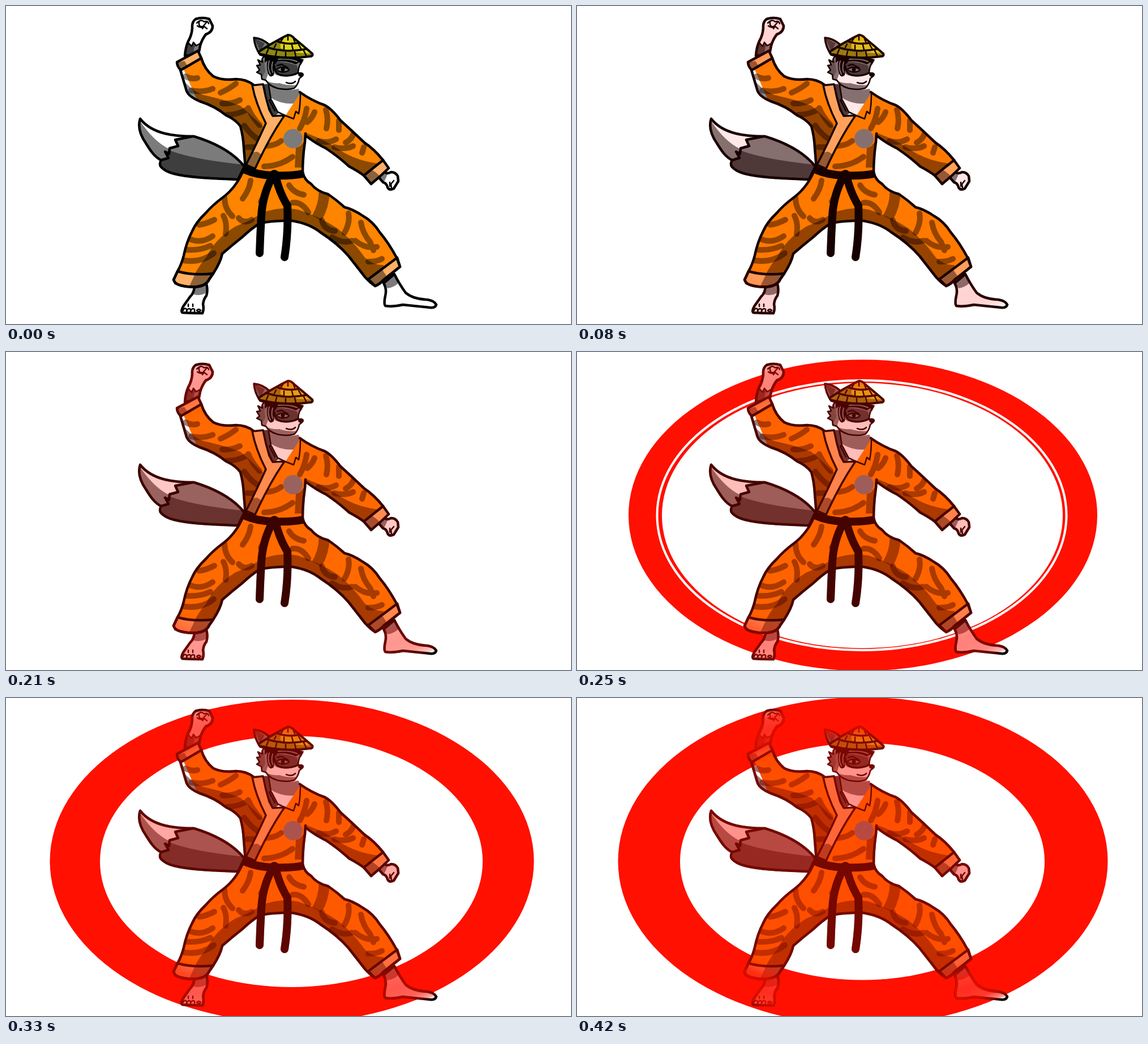
Write an HTML page that moves like this. It is 998 px wide and 561 px high and loops after 500 ms.

```html
<!DOCTYPE html>
<html lang="en">
<head>
<meta charset="utf-8">
<title>Karate fox</title>
<style>
  html, body { margin: 0; width: 100%; height: 100%; overflow: hidden; background: #fff; }
  svg { display: block; width: 998px; height: 561px; }
  .ink { fill: none; stroke: #000; stroke-width: 4.5; stroke-linejoin: round; stroke-linecap: round; }
  .thin { stroke-width: 2.5; }
  .stripe { fill: none; stroke: #000; stroke-opacity: .45; stroke-width: 10; stroke-linecap: round; stroke-linejoin: round; }
  .shade { fill: #000; fill-opacity: .45; }
  .cloth { fill: #ff8400; }
  .trim { fill: #ffb066; }
  .grey { fill: #7b7b7b; }
  .dark { fill: #3e3e3e; }
  .white { fill: #fff; }
</style>
</head>
<body>
<svg viewBox="0 0 998 561">
  <defs>
    <path id="tail" d="M237 199C232 214 238 229 247 242C255 255 262 266 274 272Q270 280 274 284Q281 292 297 296C325 303 365 304 410 306L421 283C400 257 365 240 332 230C300 230 259 227 237 199Z"/>
    <path id="pants" d="M420 288C412 308 401 324 384 337Q365 351 353 365Q336 381 329 397Q319 416 314 440Q310 456 303 468L296 483Q298 490 309 493Q328 498 345 494Q356 490 359 482L366 472Q379 452 382 437Q398 423 417 408Q434 392 449 383Q474 378 506 379Q536 384 555 399Q586 419 605 441Q620 460 634 478Q643 488 652 494Q661 490 667 483L696 460L690 444Q676 418 660 399Q648 380 630 370Q612 358 598 355Q585 343 569 332Q549 327 539 314Q527 307 524 293Q470 305 420 288Z"/>
    <path id="jacket" d="M308 113Q313 130 319 150Q323 160 342 168Q370 177 389 193Q405 200 414 212Q419 230 420 250L423 287Q470 304 524 294Q524 265 529 238L531 230Q548 243 565 251Q590 268 606 283Q623 292 632 299L666 272Q650 252 633 241Q611 220 591 202Q575 181 563 175Q540 167 519 152L492 194L437 139Q424 129 406 129Q382 132 366 124Q351 112 345 92Z"/>
    <path id="lapel" d="M435 140L454 138Q458 160 465 183L471 194L492 193Q466 230 440 287L424 280Q440 249 459 207Q441 172 435 140Z"/>
    <path id="cuffA" d="M302 99L339 79L345 92L309 113Q302 107 302 99Z"/>
    <path id="cuffB" d="M666 272L676 286Q662 300 645 314L632 299Z"/>
    <path id="cuffC" d="M303 468Q330 476 366 472L359 482Q354 493 338 495Q313 497 299 489L296 483Z"/>
    <path id="cuffD" d="M691 444L696 460L667 483Q661 491 652 494L640 482Z"/>
    <path id="fist" d="M316 88Q317 73 322 62Q328 52 329 39Q328 28 335 23Q347 19 359 23L365 35Q365 46 353 50Q346 59 343 70L340 85Z"/>
    <path id="hand" d="M663 290Q673 298 680 293Q688 293 692 300L693 309L685 322Q677 326 674 320Q672 312 666 311L659 303Z"/>
    <path id="footA" d="M333 492Q333 506 325 513L313 530Q308 539 312 541Q329 542 347 542Q350 535 348 526Q349 517 354 511Q357 501 354 490Z"/>
    <path id="footB" d="M667 489Q673 499 670 511Q667 525 670 529Q683 531 701 527Q720 529 749 532Q758 533 760 527Q757 520 744 518Q719 517 706 506Q695 491 686 473Z"/>
    <path id="face" d="M459 88Q450 91 453 99L445 95L449 104L443 105L448 113L443 117L451 121L452 129L459 131Q465 141 479 145Q497 149 509 145Q516 139 518 128L524 123Q525 118 516 118Q516 106 524 96Q490 84 459 88Z"/>
    <path id="hat" d="M498 51Q504 51 509 57Q525 70 541 84Q543 89 536 89Q492 95 449 85Q444 82 449 79Q473 63 498 51Z"/>
    <path id="ear" d="M438 56Q439 72 449 86L460 89L466 69Q453 57 438 56Z"/>

    <clipPath id="inTail"><use href="#tail"/></clipPath>
    <clipPath id="inPants"><use href="#pants"/></clipPath>
    <clipPath id="inJacket"><use href="#jacket"/></clipPath>
    <clipPath id="inLapel"><use href="#lapel"/></clipPath>
    <clipPath id="inFace"><use href="#face"/></clipPath>
    <clipPath id="inHat"><use href="#hat"/></clipPath>

    <radialGradient id="heat" gradientUnits="userSpaceOnUse" cx="0" cy="0" r="1" gradientTransform="translate(504 288) scale(461 307)">
      <stop offset=".583" stop-color="#ff1000" stop-opacity=".46"/>
      <stop offset=".692" stop-color="#ff1000" stop-opacity=".5"/>
      <stop offset=".725" stop-color="#ff1000" stop-opacity=".62"/>
      <stop offset=".767" stop-color="#ff1000" stop-opacity=".82"/>
      <stop offset=".833" stop-color="#ff1000" stop-opacity=".88"/>
      <stop offset=".9" stop-color="#ff1000" stop-opacity=".82"/>
      <stop offset=".925" stop-color="#ff1000" stop-opacity=".62"/>
      <stop offset=".938" stop-color="#ff1000" stop-opacity=".5"/>
      <stop offset=".958" stop-color="#ff1000" stop-opacity="0"/>
    </radialGradient>
    <mask id="body" maskUnits="userSpaceOnUse" x="0" y="0" width="998" height="561" style="mask-type:alpha"><use href="#hero"/></mask>
  </defs>

  <g id="ring" opacity="0">
    <ellipse id="outer" cx="505" cy="288" fill="#ff1000"/>
    <ellipse id="inner" cx="504" cy="288.5" fill="#fff"/>
    <ellipse id="gap" cx="503" cy="288" rx="361.5" ry="238" fill="none" stroke="#fff" stroke-width="4"/>
  </g>

  <g id="hero">
    <!-- tail -->
    <use href="#tail" class="grey"/>
    <g clip-path="url(#inTail)">
      <path class="white" d="M230 190L330 230L299 237L304 247L288 252Q262 240 236 202Z"/>
      <path class="dark" d="M287 254Q330 271 422 280L420 320H260L276 274L287 267L283 260Z"/>
    </g>
    <path class="ink" d="M330 230L299 236L304 247L289 251L288 261L281 257L287 268L274 272"/>
    <use href="#tail" class="ink"/>

    <!-- hands and feet -->
    <use href="#fist" class="white"/>
    <path class="dark" d="M316 88L321 64L328 71L331 64L336 71L343 66L340 86Z"/>
    <path class="grey" d="M333 72L337 70L343 67L340 82L330 86Z"/>
    <use href="#fist" class="ink"/>
    <path class="ink thin" d="M321 64L328 71L331 64L336 70L343 66M337 30Q345 22 350 28Q356 25 358 31M341 28Q340 38 348 36L354 29M338 35Q344 40 350 36L355 40M349 37L347 40"/>
    <use href="#hand" class="white"/>
    <path class="grey" d="M664 291L674 297L668 310L659 303Z"/>
    <use href="#hand" class="ink"/>
    <path class="ink thin" d="M685 308L680 314L681 321M678 311V318"/>
    <use href="#footA" class="white"/>
    <path class="grey" d="M334 492L354 490L355 505Q343 513 329 508Z"/>
    <use href="#footA" class="ink"/>
    <path class="ink thin" d="M313 537Q315 531 319 535V539Q321 532 326 535V539Q328 532 333 535V539M337 537Q340 533 344 537Q341 541 337 537M322 526V530M330 526V530"/>
    <use href="#footB" class="white"/>
    <path class="grey" d="M668 490L686 474L693 489Q684 497 674 498Z"/>
    <use href="#footB" class="ink"/>

    <!-- trousers -->
    <use href="#pants" class="cloth"/>
    <g clip-path="url(#inPants)">
      <path class="stripe" d="M432 308Q430 324 418 340M462 315Q459 330 450 345M386 338Q386 358 400 371M384 370Q391 383 388 402M411 374Q420 385 434 377M341 386Q355 384 368 377M324 411Q345 420 365 406M318 430Q342 432 361 423M309 448Q343 455 367 436M500 316Q508 330 526 333M506 347Q522 345 534 364M605 366Q608 382 598 400M627 382Q630 401 643 416L649 431M617 414Q635 429 655 425M558 378Q562 395 581 397M576 408Q595 420 611 414M640 451Q656 451 664 446"/>
      <path class="stripe" style="stroke-width:19;stroke-linecap:butt" d="M562 328Q562 352 549 374"/>
      <path class="shade" d="M323 500Q333 466 354 443Q368 412 405 389Q434 378 452 365Q482 353 515 359Q553 371 585 392Q614 415 634 444Q650 458 667 457L655 510L490 382H450L380 440L358 500Z"/>
    </g>
    <use href="#cuffC" class="trim"/>
    <path class="shade" d="M333 475L365 472L357 487Q343 496 324 494Z"/>
    <use href="#cuffD" class="trim"/>
    <path class="shade" d="M641 482L664 464L673 478L652 494Z"/>
    <use href="#cuffC" class="ink"/>
    <use href="#cuffD" class="ink"/>
    <use href="#pants" class="ink"/>

    <!-- neck and chest -->
    <path class="dark" d="M453 138L468 137L483 188L471 196L462 180Z"/>
    <path class="white" d="M464 139L517 146L520 156L518 188L512 185L509 199L500 194L493 200L479 187L469 166Z"/>
    <path class="grey" d="M464 139Q490 152 517 146L521 170Q492 177 468 162Z"/>

    <!-- jacket -->
    <path class="cloth" d="M484 208L520 153L517 190L508 200L494 194Z"/>
    <g clip-path="url(#inJacket)">
      <path class="cloth" d="M300 80H458L460 207L492 193L506 199L511 187L517 190L521 150H680V310H400Z"/>
      <path class="stripe" d="M317 124Q328 130 338 127M327 149Q348 153 365 146M379 153Q395 146 406 137M382 172Q399 173 413 166M390 192Q409 192 425 183M428 180Q434 195 448 210M421 211Q431 226 445 235M426 249H439M455 247Q475 247 486 238M456 283Q485 282 506 266M531 181Q528 201 519 216M545 187Q541 198 532 205M565 183Q570 198 566 216M588 202V219M614 225Q611 235 600 241M632 249L629 259M552 238Q569 243 583 235M580 249Q599 254 613 247"/>
      <path class="shade" d="M300 115Q328 153 353 158Q389 166 414 176Q437 196 454 213L427 282L410 290V210L310 170Z"/>
      <path class="shade" d="M530 224Q566 237 594 257Q621 273 657 278L632 303L529 237Z"/>
      <path class="shade" d="M512 250Q520 250 528 236L525 285H510Z"/>
    </g>
    <path class="ink" d="M437 139Q424 129 406 129Q382 132 366 124Q351 112 345 92M308 113Q313 130 319 150Q323 160 342 168Q370 177 389 193Q405 200 414 212Q419 230 420 250L423 287M519 152Q540 167 563 175Q575 181 591 202Q611 220 633 241Q650 252 666 272M632 299Q623 292 606 283Q590 268 565 251Q548 243 531 230M529 225L528 240Q524 266 524 294"/>
    <path class="ink thin" d="M520 153Q520 175 517 190L512 186L508 199L495 194L480 187L469 166M464 140L468 165L465 166L475 185M453 139Q459 168 471 194"/>
    <use href="#lapel" class="trim"/>
    <path class="shade" clip-path="url(#inLapel)" d="M420 260L444 257L453 263L438 294H418Z"/>
    <use href="#lapel" class="ink" style="stroke-width:3.5"/>
    <use href="#cuffA" class="trim"/>
    <path class="shade" d="M303 100L315 97L321 106L309 113Z"/>
    <use href="#cuffA" class="ink"/>
    <use href="#cuffB" class="trim"/>
    <path class="shade" d="M632 299L646 289Q655 294 660 300L645 314Z"/>
    <use href="#cuffB" class="ink"/>
    <circle class="grey" cx="507" cy="234" r="17"/>

    <!-- belt -->
    <path class="ink" style="stroke-width:14;stroke-linecap:butt" d="M420 288Q445 299 474 299Q505 300 524 296"/>
    <path class="ink" style="stroke-width:14" d="M470 302Q453 334 451 371Q449 405 448 436M477 304Q484 331 497 352Q499 400 492 443"/>
    <circle cx="474" cy="298" r="9"/>

    <!-- head -->
    <use href="#ear" class="grey"/>
    <path class="dark" d="M438 56L449 80L457 66Z"/>
    <path class="white" d="M449 86L452 82L462 87Z"/>
    <use href="#ear" class="ink" style="stroke-width:3.5"/>
    <use href="#face" class="grey"/>
    <g clip-path="url(#inFace)">
      <path class="white" d="M465 114L478 122Q497 127 513 119L530 120V137Q504 143 483 136Q466 137 459 131Z"/>
      <path class="dark" d="M440 90L456 96L458 116L453 125L440 124Z" fill-opacity=".55"/>
      <path class="dark" d="M469 101Q485 95 514 105L517 118Q503 126 484 122Q474 119 469 101Z"/>
    </g>
    <path class="ink" d="M474 106Q475 120 486 122Q502 125 516 118" style="stroke-width:3.5"/>
    <path class="grey" d="M478 113Q487 103 500 112Q488 120 478 113Z"/>
    <path class="ink thin" d="M478 112Q487 104 500 112M480 114Q490 119 499 114M479 105L487 103L498 109M495 135Q505 139 511 133"/>
    <circle cx="489" cy="112" r="3.5"/>
    <ellipse cx="521" cy="121" rx="5" ry="4"/>
    <use href="#face" class="ink thin"/>
    <path d="M457 86Q490 87 526 94L521 104L518 99L512 103Q495 96 479 98L474 104L473 122Q466 128 463 119Q459 107 462 96L457 100Z"/>
    <path class="ink" style="stroke:#7b7b7b;stroke-width:2" d="M465 97Q461 109 467 120M471 99Q468 109 471 117M481 94Q499 92 514 98"/>

    <!-- hat -->
    <use href="#hat" fill="#ddd21a"/>
    <g clip-path="url(#inHat)">
      <path fill="#8f8710" d="M440 80L494 52Q483 65 485 74Q505 84 544 84L540 98H440Z"/>
      <path class="ink" style="stroke-width:3.5" d="M478 62Q497 69 517 65M461 73Q493 83 530 76"/>
      <path class="ink thin" d="M498 54V60M489 57L486 62M508 58L510 63M477 67L474 73M491 69V77M505 69L507 77M517 68L521 75M463 77L460 84M478 80L476 88M494 82V90M510 81L512 89M526 79L530 87"/>
    </g>
    <use href="#hat" class="ink" style="stroke-width:4"/>
  </g>

  <rect id="glow" width="998" height="561" fill="url(#heat)" mask="url(#body)" opacity="0"/>
</svg>
<script>
  const LOOP = 500;
  const steps = [0, 40, 80, 130, 170, 210, 250, 290, 330, 380, 420];
  const RING_AT = 6;
  const outer = [[414, 274.5], [421, 280], [427.5, 285], [430, 287.5], [432.5, 289.5]];
  const inner = [[354, 234], [346, 228], [338, 221.5], [330, 215], [322, 209]];

  // Plays one held value per step, forever.
  function hold(id, pose) {
    const keys = steps.map((t, i) => ({ ...pose(i), offset: t / LOOP, easing: 'steps(1, end)' }));
    keys.push({ ...pose(steps.length - 1), offset: 1 });
    document.getElementById(id).animate(keys, { duration: LOOP, iterations: Infinity });
  }

  const radii = list => i => {
    const [rx, ry] = list[Math.max(0, i - RING_AT)];
    return { rx: rx + 'px', ry: ry + 'px' };
  };

  hold('glow', i => ({ opacity: i / 10 }));
  hold('ring', i => ({ opacity: i < RING_AT ? 0 : 1 }));
  hold('gap', i => ({ opacity: i === RING_AT ? 1 : 0 }));
  hold('outer', radii(outer));
  hold('inner', radii(inner));
</script>
</body>
</html>
```
